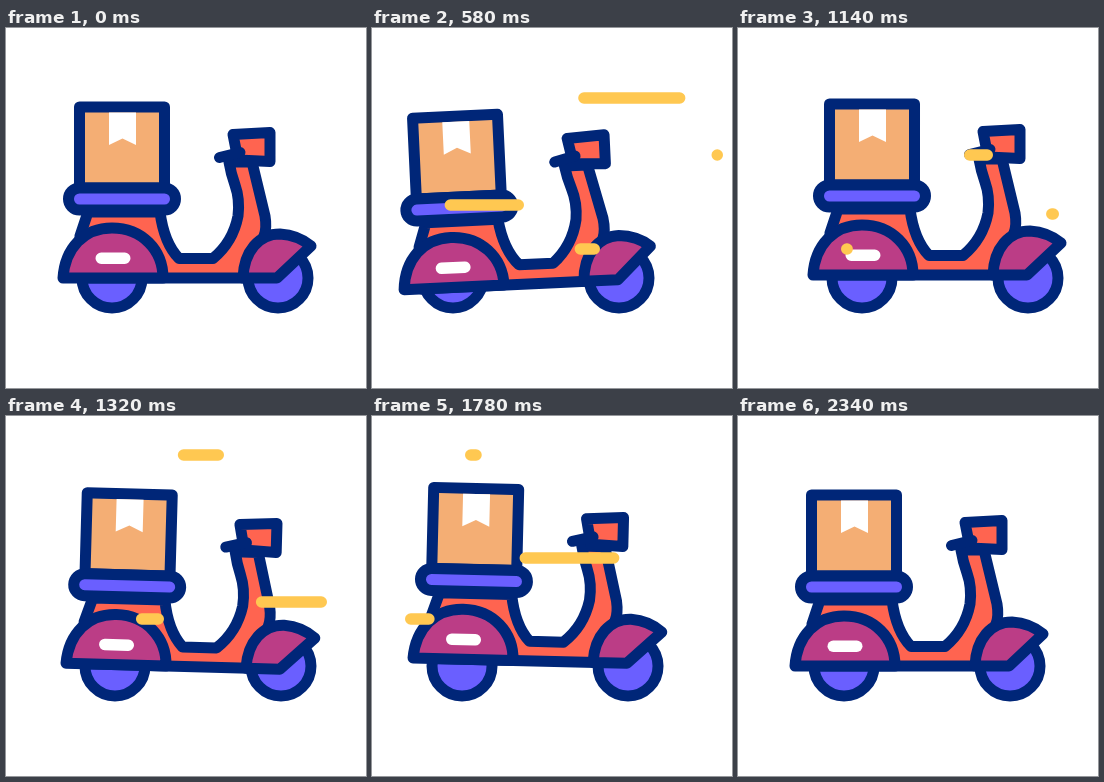
Write an HTML page that moves like this. It is 360 px wide and 360 px high and loops after 2.4 s.

```html
<!DOCTYPE html>
<html lang="en">
<head>
<meta charset="utf-8">
<title>Delivery scooter</title>
<style>
  html, body { margin: 0; width: 100%; height: 100%; overflow: hidden; background: #fff; }
  svg { display: block; width: 100vw; height: 100vh; }
  .ink { stroke: #002678; stroke-width: 11; stroke-linecap: round; stroke-linejoin: round; }
  .violet { fill: #6a5fff; }
  .coral { fill: #ff6450; }
  .plum { fill: #bb3d86; }
  .card { fill: #f4ae74; }
  .white { fill: #fff; }
  #wind rect { fill: #ffc851; }
</style>
</head>
<body>
<svg viewBox="0 0 360 360">
  <g id="wheels" class="ink violet">
    <circle cx="106" cy="250" r="30"/>
    <circle cx="272" cy="250" r="30"/>
  </g>
  <g id="body">
    <g class="ink">
      <path class="coral" d="M82 184L74 208V250H240L258 208Q261 200 259 188L246 134H223Q225 146 229 157Q234 171 232 188Q227 214 207 230.500H173Q158 215 154 184Z"/>
      <path class="plum" d="M57 250C59 220 78 200 106 200C136 200 157 222 157 250Z"/>
      <path class="plum" d="M237 250C238 223 253 206 274 206Q292 207 305 218L271 250Z"/>
      <path class="coral" d="M227 106.500L264 104.500V133.500L232 132Z"/>
      <path d="M213.500 129.500L234 124.500"/>
      <rect class="card" x="73.500" y="79" width="85" height="81"/>
      <rect class="violet" x="62.500" y="160" width="107" height="22" rx="11"/>
    </g>
    <path class="white" d="M103 84.500H130V117L116.500 110.500L103 117Z"/>
    <rect class="white" x="89.500" y="224.500" width="35" height="11.500" rx="5.750"/>
  </g>
  <g id="wind"></g>
</svg>
<script>
const LOOP = 2400;
const SPAN = 125, THICK = 11.5, TRAVEL = SPAN - THICK;
const SWEEP = 405, LAG = 262;
const REST = { x: 0, y: 0, tilt: 0 };

// Key poses, joined by a smooth curve
const poses = [
  { t: 0, ...REST },
  { t: 580, x: -25, y: 6, tilt: -2.7 },
  { t: 820, x: -6, y: -4.2, tilt: -1.8 },
  { t: 1140, x: 18, y: -3, tilt: 0 },
  { t: 1480, x: -13, y: 2.6, tilt: 2.6 },
  { t: 1780, x: -16, y: -5, tilt: 1.4 },
  { t: 2190, ...REST }
];

const gusts = [
  { right: 318.5, y: 70, start: 264 },
  { right: 152, y: 177, start: 353 },
  { right: 228, y: 221, start: 489 },
  { right: 351, y: 127, start: 578 },
  { right: 321, y: 186, start: 1112 },
  { right: 218, y: 39, start: 1170 },
  { right: 158, y: 203, start: 1220 },
  { right: 272, y: 142, start: 1394 }
];

const $ = id => document.getElementById(id);
const clamp = x => Math.min(1, Math.max(0, x));
const ease = x => (1 - Math.cos(Math.PI * clamp(x))) / 2;

function slope(i, key) {
  const a = poses[i - 1], b = poses[i + 1];
  return a && b ? (b[key] - a[key]) / (b.t - a.t) : 0;
}

// Cubic Hermite curve through the poses
function poseAt(time, key) {
  const i = poses.findIndex(p => p.t > time);
  if (i < 0) return REST[key];
  const a = poses[i - 1], b = poses[i], d = b.t - a.t;
  const u = (time - a.t) / d, v = 1 - u;
  return a[key] * v * v * (1 + 2 * u) + b[key] * u * u * (1 + 2 * v)
    + d * u * v * (slope(i - 1, key) * v - slope(i, key) * u);
}

for (const gust of gusts) {
  gust.el = document.createElementNS("http://www.w3.org/2000/svg", "rect");
  gust.el.setAttribute("y", gust.y - THICK / 2);
  gust.el.setAttribute("height", THICK);
  gust.el.setAttribute("rx", THICK / 2);
  $("wind").append(gust.el);
}

// The front end runs left first, the back end follows
function drawGust({ el, right, start }, t) {
  const age = t - start;
  const head = TRAVEL * ease(age / SWEEP);
  const tail = TRAVEL * ease((age - LAG) / SWEEP);
  const shown = age >= 0 && age < SWEEP + LAG;
  el.setAttribute("visibility", shown ? "visible" : "hidden");
  el.setAttribute("x", right - THICK - head);
  el.setAttribute("width", THICK + head - tail);
}

function draw(t) {
  const x = poseAt(t, "x"), y = poseAt(t, "y"), tilt = poseAt(t, "tilt");
  $("wheels").setAttribute("transform", `translate(${x} 0)`);
  $("body").setAttribute("transform", `translate(${x} ${y}) rotate(${tilt} 180 250)`);
  gusts.forEach(gust => drawGust(gust, t));
}

const begin = performance.now();
function tick() {
  draw((performance.now() - begin) % LOOP);
  requestAnimationFrame(tick);
}
tick();
</script>
</body>
</html>
```
